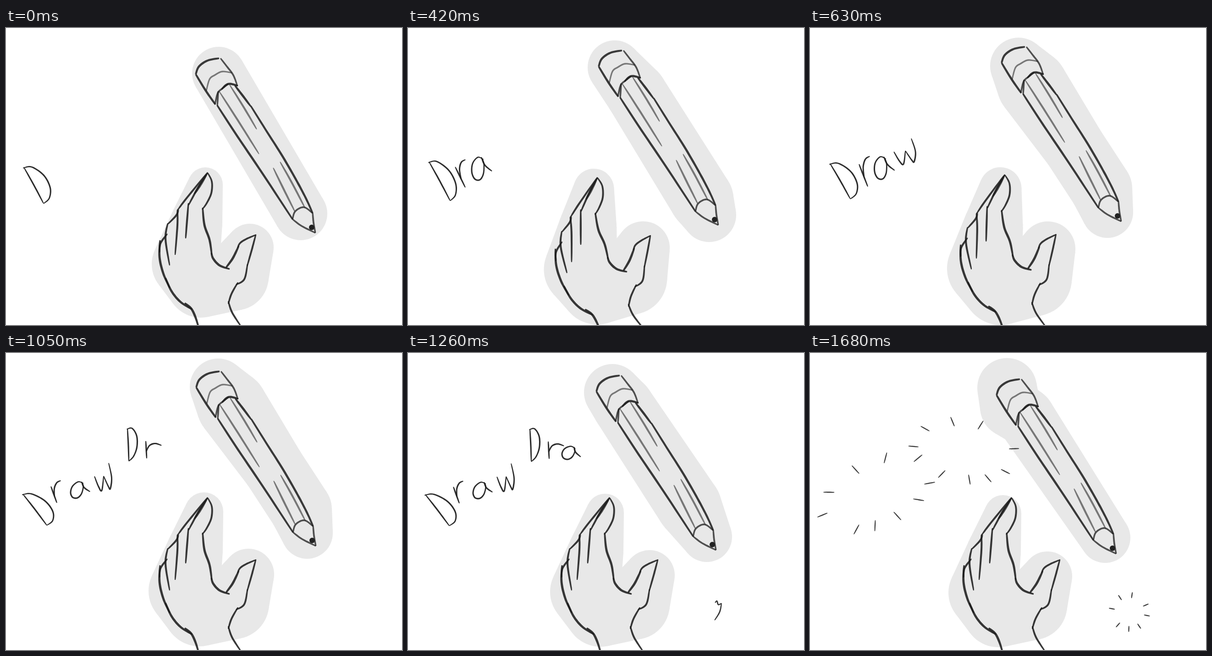
Animation, 864 px wide and 648 px high, one loop 1.89 s. Source, as an HTML page:

```html
<!DOCTYPE html>
<html lang="en">
<head>
<meta charset="utf-8">
<title>Draw Draw</title>
<style>
html, body { margin: 0; width: 100%; height: 100%; overflow: hidden; background: #fff; }
svg { display: block; width: 864px; height: 648px; }
</style>
</head>
<body>
<svg id="stage" viewBox="0 0 864 648"></svg>
<script>
const STEP = 210, SHADE = '#e8e8e8';
const stage = document.getElementById('stage');

// "1 2 3 4" -> rows of the given length
function rows(text, size = 2) {
  const n = text.split(' ').map(Number), out = [];
  for (let i = 0; i < n.length; i += size) out.push(n.slice(i, i + size));
  return out;
}

// Catmull-Rom samples through the points
function spline(p) {
  const out = [], last = p.length - 1, div = 8;
  const at = i => p[Math.max(0, Math.min(last, i))];
  for (let i = 0; i < last; i++) {
    const [a, b, c, d] = [at(i - 1), at(i), at(i + 1), at(i + 2)];
    for (let j = 0; j < div; j++) {
      const t = j / div;
      out.push([0, 1].map(k => b[k] + 0.5 * t * (c[k] - a[k] +
        t * (2 * a[k] - 5 * b[k] + 4 * c[k] - d[k] +
        t * (3 * (b[k] - c[k]) + d[k] - a[k])))));
    }
  }
  return [...out, p[last]];
}

const poly = (p, fill, alpha = 1) =>
  `<path d="M${p.map(q => q[0].toFixed(1) + ' ' + q[1].toFixed(1)).join('L')}Z" fill="${fill}" fill-opacity="${alpha}"/>`;

// Brush stroke that thins towards both ends
function brush(points, width = 3, alpha = 0.87, end = 0.5) {
  const p = spline(points), left = [], right = [], n = p.length - 1;
  p.forEach(([x, y], i) => {
    const a = p[Math.max(0, i - 1)], b = p[Math.min(n, i + 1)];
    const dx = b[0] - a[0], dy = b[1] - a[1], len = Math.hypot(dx, dy) || 1;
    const w = width / 2 * (end + (1 - end) * Math.sqrt(Math.abs(Math.sin(Math.PI * i / n))));
    left.push([x - dy / len * w, y + dx / len * w]);
    right.unshift([x + dy / len * w, y - dx / len * w]);
  });
  return poly(left.concat(right), '#1c1c1c', alpha);
}
const sketch = (lines, ...style) => lines.map(s => brush(rows(s), ...style)).join('');

const group = (body, move) => `<g transform="${move}">${body}</g>`;
const shift = (x, y) => `translate(${x} ${y})`;

// Fat marker: circles (x, y, r) joined by their outer tangents
function marker(text, grow = 0) {
  const c = rows(text, 3).map(([x, y, r]) => [x, y, r + grow]);
  const rim = ([x, y, r], a) => [x + r * Math.cos(a), y + r * Math.sin(a)];
  return c.map((b, i) => {
    const dot = `<circle cx="${b[0]}" cy="${b[1]}" r="${b[2]}" fill="${SHADE}"/>`;
    if (!i) return dot;
    const a = c[i - 1], dx = b[0] - a[0], dy = b[1] - a[1];
    const dir = Math.atan2(dy, dx), open = Math.acos((a[2] - b[2]) / Math.hypot(dx, dy));
    return dot + poly([rim(a, dir + open), rim(b, dir + open), rim(b, dir - open), rim(a, dir - open)], SHADE);
  }).join('');
}

const pencil =
  sketch(['414 101 421 84 440 71 465 66', '414 101 436 137 457 167', '461 169 500 229 560 318 625 417',
    '534 170 571 229 604 281 635 335 656 375 669 404'], 4.7, .85, .7) +
  sketch(['468 66 482 84 496 103 505 127', '456 166 462 142 472 132 485 122', '463 138 461 170',
    '625 418 631 400 650 391 669 404', '669 403 671 425 675 447', '625 417 645 432 675 447'], 3.8, .75, .7) +
  sketch(['437 137 444 112 455 103 472 95 493 98'], 3.5, .55, .7) +
  sketch(['470 134 485 122 506 126', '499 125 516 147 534 171'], 4.8) +
  sketch(['465 138 510 208 552 275', '488 124 520 175 547 221', '583 305 606 352 630 400',
    '598 292 625 340 652 392'], 4.2, .55, .35) +
  '<circle cx="667" cy="435" r="6" fill="#222"/>';

const fingers = sketch(['440 315 395 370 376 395', '440 316 417 352 398 387', '398 382 395 420 392 459',
  '376 394 372 408 353 428', '374 396 374 430 369 495', '353 426 348 460 357 518',
  '352 449 337 470 335 490'], 4.2) + sketch(['438 319 424 342 411 362'], 6, .7, .3);
const palm = sketch(['440 316 449 335 448 360 438 382 428 396', '505 480 511 469 525 460 546 451',
  '545 451 536 485 526 520', '527 515 520 548 502 560', '506 555 492 580 485 602', '485 596 493 620 512 650'], 4) +
  sketch(['429 392 433 430 444 462 449 495', '448 490 452 503 466 518 488 526', '480 523 495 502 508 475',
    '336 463 335 500 343 535 357 567', '348 545 361 574 380 597 406 614', '390 600 404 612 413 630 420 652'], 5);
const hand = fingers + palm;
const handShade = '435 342 38 415 425 57 392 515 74 425 557 75 500 543 73 532 479 52';

// Letters on a slanted grid: u runs across, v runs down the stem
const glyphs = {
  D: ['0 0 .02 .5 0 1', '-.08 .02 .5 -.01 .97 .22 .95 .56 .54 .85 0 1'],
  r: ['0 0 0 .5 0 1', '0 .6 .22 .13 .6 -.22 1 -.35'],
  a: ['.2 .1 -.3 0 -.72 .27 -.75 .67 -.45 .97 0 1 .27 .73 .25 .27 0 0', '0 0 .35 .35 1 .62'],
  w: ['0 0 -.06 .68 0 1 .44 .4', '.44 .4 .41 1.11 .45 1.29 .78 .83 1 0']
};
// Placement: stem top, stem foot, width, rise of the width
function letter(text) {
  const [name, ...n] = text.split(' ');
  const [x, y, fx, fy, w, h = 0] = n.map(Number);
  return glyphs[name].map(s => brush(rows(s).map(([u, v]) =>
    [x + u * w + v * (fx - x), y + u * h + v * (fy - y)]), 3.2, .92, .45)).join('');
}
const write = (...list) => list.map(letter).join('');

const both = ['D 38 309 90 377 38', 'r 99 292 112 328 26', 'a 166 282 157 317 24', 'w 194 270 210 301 31 -29',
  'D 266 166 269 237 20', 'r 306 193 308 231 35 23', 'a 362 205 349 232 23 5', 'w 394 200 409 234 34 -18'];
const mark = sketch(['670 545 674 541 677 549 684 546', '684 546 680 565 669 583'], 2.8);

// Short strokes pointing away from the middle of a tilted ellipse
const burst = (x, y, rx, ry, tilt, len, angles) => angles.map(deg => {
  const a = deg * Math.PI / 180, t = tilt * Math.PI / 180;
  const u = rx * Math.cos(a), v = ry * Math.sin(a);
  const dx = u * Math.cos(t) - v * Math.sin(t), dy = u * Math.sin(t) + v * Math.cos(t);
  const k = len / 2 / Math.hypot(dx, dy);
  return brush([1 - k, 1, 1 + k].map(s => [x + dx * s, y + dy * s]), 2.4, .85, .35);
}).join('');
const sparks =
  burst(145, 305, 128, 66, -25, 24, [-137, -99, -67, -27, 27, 53, 81, 105, 125, 185]) +
  burst(337, 213, 112, 62, 8, 22, [-145, -108, -76, -18, 32, 58, 80, 112, 174]) +
  burst(697, 565, 39, 37, 0, 13, [-82, -122, -24, 12, 57, 92, 130, 191]);

const shades = [
  '464 99 58 643 405 58',
  '451 86 59 498 143 67 640 372 70 657 408 59',
  '455 83 62 485 125 77 575 258 68 635 350 68 649 402 56',
  '460 74 53 560 240 52 636 358 58 643 383 53',
  '446 86 62 470 117 67 613 333 71 652 401 55',
  '430 76 65 437 118 66 470 140 64 644 403 55'
];

// shade: [index, x, y]; at: pencil offset; turn: hand x, y, degrees; glow: hand shade x, y, growth
function scene({ shade: [i, sx = 0, sy = 0], at, turn = [0, 0, 0], glow: [gx, gy, grow], ink }) {
  const pose = `translate(${turn[0]} ${turn[1]}) rotate(${turn[2]} 486 600)`;
  return group(marker(shades[i]), shift(sx, sy)) +
    group(marker(handShade, grow), shift(gx, gy) + pose) +
    group(pencil, shift(...at)) + group(hand, pose) + ink;
}
const scenes = [
  { shade: [0], at: [0, 0], glow: [0, 0, 0], ink: write('D 39 304 82 383 35') },
  { shade: [0, 0, -10], at: [1, -8], turn: [-2, 3, -2.3], glow: [0, 0, 2],
    ink: write('D 41 298 87 380 35', 'r 99 305 121 350 30') },
  { shade: [1], at: [2, -17], turn: [-4, 6, -4.6], glow: [-5, -2, 6],
    ink: write('D 46 292 92 377 34', 'r 103 303 125 348 30', 'a 160 282 157 331 25') },
  { shade: [2], at: [4, -25], turn: [-1, 2, -2.8], glow: [-6, 3, 8],
    ink: write('D 44 296 88 373 36', 'r 107 297 126 346 30', 'a 161 281 159 329 25', 'w 183 270 204 297 38 -29') },
  { shade: [3], at: [6, -34], glow: [-1, 3, 5],
    ink: write('D 41 295 87 375 41', 'r 103 293 124 342 32', 'a 160 280 153 331 25', 'w 183 270 201 300 36 -40',
      'D 264 159 272 230 27') },
  { shade: [2, 8, -9], at: [1, -26], glow: [-3, 4, 4], ink: group(write(...both.slice(0, 6)), shift(-1, -1)) },
  { shade: [4], at: [-3, -17], glow: [-5, 6, 3], ink: write(...both.slice(0, 7)) + mark },
  { shade: [1, 6, -13], at: [-5, -13], glow: [-8, 6, 3], ink: write(...both) + mark },
  { shade: [5], at: [-7, -9], glow: [-14, 8, 2], ink: sparks }
].map(scene);

const start = performance.now();
let shown = -1;
function tick() {
  const i = Math.floor((performance.now() - start) / STEP) % scenes.length;
  if (i !== shown) stage.innerHTML = scenes[shown = i];
  requestAnimationFrame(tick);
}
tick();
</script>
</body>
</html>
```
